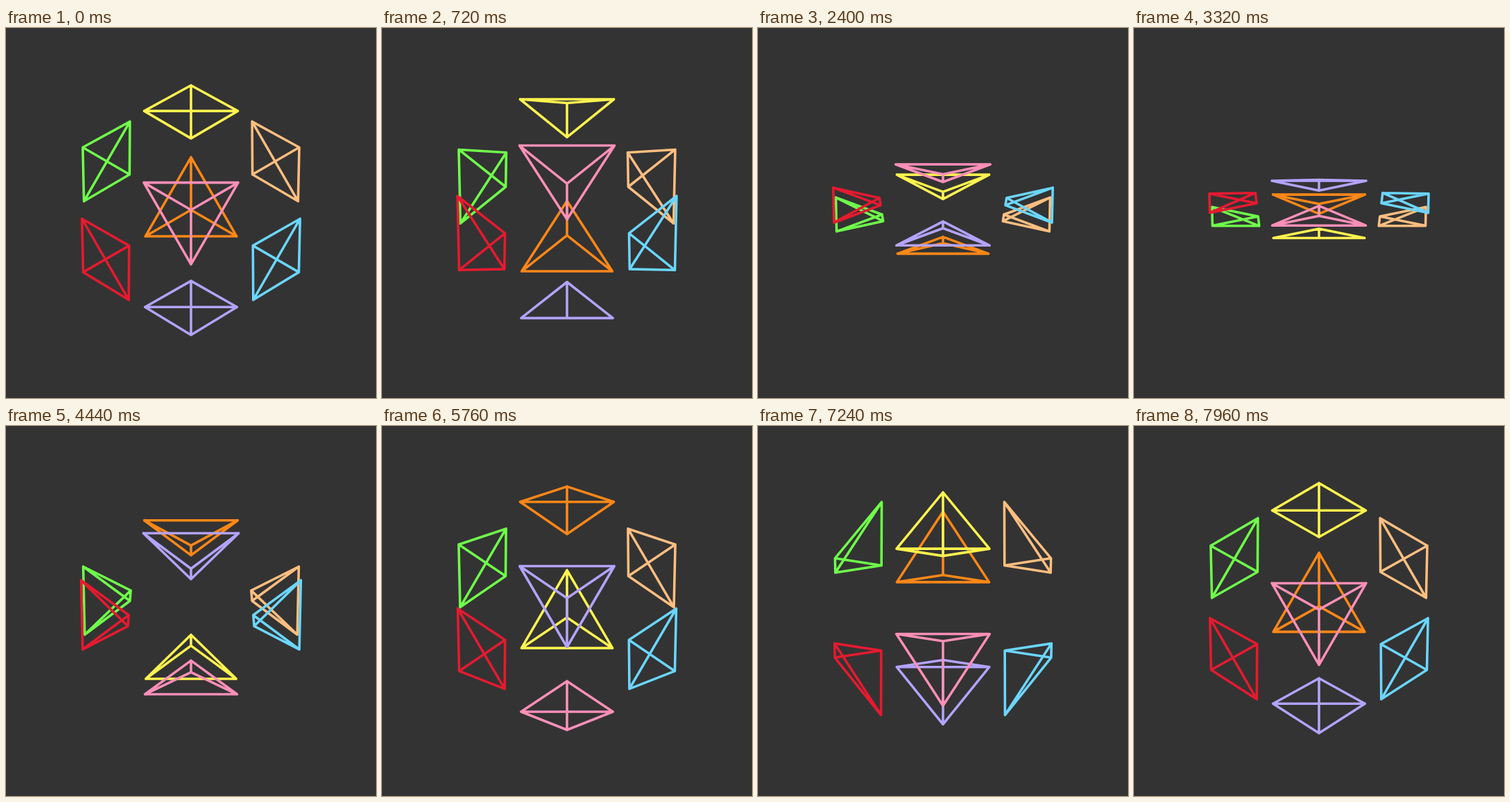
An HTML page with a canvas for the animation above (8 s loop, 540 by 540 pixels).

```html
<!DOCTYPE html>
<html lang="en">
<head>
<meta charset="utf-8">
<title>Tetrahedra</title>
<style>
html, body { margin: 0; width: 100%; height: 100%; overflow: hidden; background: #333; }
canvas { display: block; width: 540px; height: 540px; }
</style>
</head>
<body>
<canvas id="stage" width="540" height="540"></canvas>
<script>
const ctx = document.getElementById('stage').getContext('2d');
const LOOP = 8000;
const CENTER = { x: 270, y: 265.5 };
const INNER = 90;                      // distance of a corner from the vertical axis
const REACH = 67.7;                    // how far the side points extend
const HEIGHT = INNER / Math.SQRT2;
const EDGE = REACH * Math.SQRT2;
const VIEW = 5000;                     // perspective distance

// Side (x), depth (z) and height (y) direction of each solid
const solids = [
  ['#fff34f', 0, 1, 1],
  ['#ff8718', 0, -1, 1],
  ['#ff8fb8', 0, 1, -1],
  ['#b4a3ff', 0, -1, -1],
  ['#6fff4b', -1, 0, 1],
  ['#ffbe80', 1, 0, 1],
  ['#e61a30', -1, 0, -1],
  ['#6bd6ff', 1, 0, -1]
].map(([color, sx, sz, sy]) => {
  const y = sy * HEIGHT;
  const outer = INNER + REACH;
  const side = s => ({
    x: sx ? sx * outer : s * REACH,
    y,
    z: sz ? sz * outer : s * REACH
  });
  const corner = { x: sx * INNER, y, z: sz * INNER };
  const tip = { ...corner, y: y + sy * EDGE };
  return { color, points: [corner, tip, side(-1), side(1)] };
});

function projector(angle) {
  const cos = Math.cos(angle), sin = Math.sin(angle);
  const upY = 1 / Math.sqrt(6) + cos / Math.sqrt(3);
  const upZ = Math.sqrt(2 / 3) * sin;
  const nearY = cos / Math.sqrt(6) - 1 / Math.sqrt(3);
  const nearZ = sin / Math.sqrt(3);
  return p => {
    const depth = p.y * nearY + p.z * nearZ;
    const scale = VIEW / (VIEW - depth);
    return {
      x: CENTER.x + p.x * scale,
      y: CENTER.y - (p.y * upY + p.z * upZ) * scale,
      depth
    };
  };
}

function drawSolid({ color, points }) {
  ctx.strokeStyle = color;
  ctx.beginPath();
  points.forEach((a, i) => points.slice(i + 1).forEach(b => {
    ctx.moveTo(a.x, a.y);
    ctx.lineTo(b.x, b.y);
  }));
  ctx.stroke();
}

function draw(time) {
  const project = projector(Math.PI / 4 + (time % LOOP) / LOOP * Math.PI * 2);
  const depthOf = s => s.points.reduce((sum, p) => sum + p.depth, 0);
  ctx.fillStyle = '#333';
  ctx.fillRect(0, 0, 540, 540);
  ctx.lineWidth = 3.6;
  ctx.lineCap = ctx.lineJoin = 'round';
  solids
    .map(s => ({ color: s.color, points: s.points.map(project) }))
    .sort((a, b) => depthOf(a) - depthOf(b))
    .forEach(drawSolid);
}

const start = performance.now();
function tick() {
  draw(performance.now() - start);
  requestAnimationFrame(tick);
}
tick();
</script>
</body>
</html>
```
